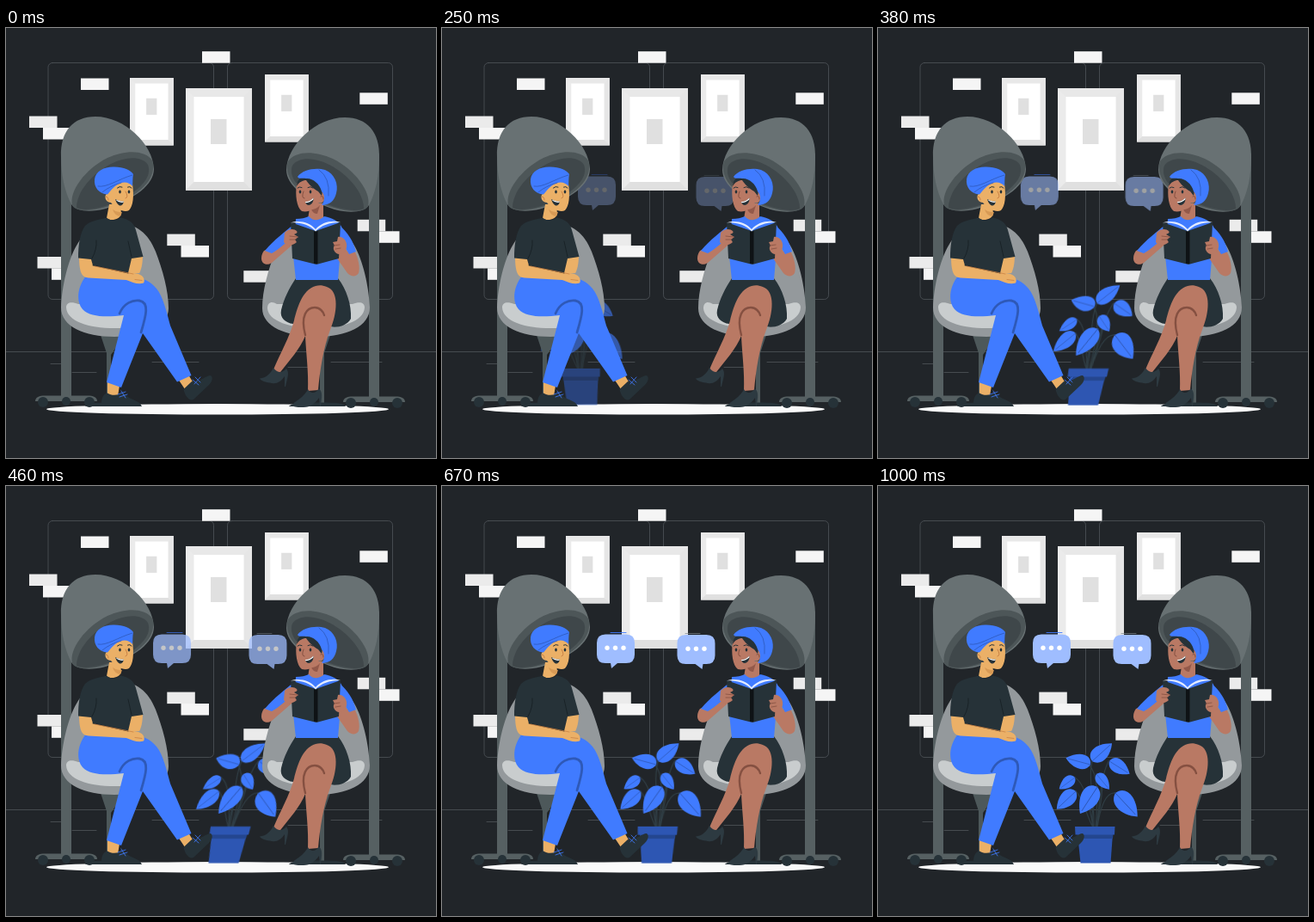
Write an HTML page without scripts that moves like this. It is 500 by 500 pixels and loops after 1.04 s.

```html
<!DOCTYPE html>
<html lang="en">
<head>
<meta charset="utf-8">
<title>Salon chat</title>
<style>
  html, body { margin: 0; width: 100%; height: 100%; overflow: hidden; background: #212529; }
  svg { display: block; width: 100vw; height: 100vh; }
  .blue { fill: #407bff; }
  .navy { fill: #2d56b3; }
  .ink { fill: #263238; }
  .pale { fill: #ebebeb; }
  .snow { fill: #f5f5f5; }
  .tan { fill: #ebb067; }
  .brown { fill: #b97964; }
  .line { fill: none; stroke-linecap: round; stroke-linejoin: round; }

  .plant, .bubble { animation: 1040ms linear infinite; }
  .plant { animation-name: dash; transform-origin: 256px 368px; }
  .bubble { animation-name: slide; }
  .left { --dir: -1; }
  .right { --dir: 1; }

  @keyframes dash {
    0%, 1.92% {
      transform: translateX(-230px) skewX(20deg); opacity: 0;
      animation-timing-function: cubic-bezier(.36, -.01, .5, 1.38);
    }
    53.85%, 56.25% {
      transform: translateX(0) skewX(-10deg); opacity: 1;
      animation-timing-function: cubic-bezier(.36, -.01, .5, 1.38);
    }
    75.5% {
      transform: translateX(0) skewX(2deg); opacity: 1;
      animation-timing-function: cubic-bezier(.36, -.01, .5, 1.38);
    }
    94.7%, 100% { transform: translateX(0) skewX(0); opacity: 1; }
  }
  @keyframes slide {
    0% { transform: translateX(calc(var(--dir) * 35px)); opacity: 0; }
    16.35% { transform: translateX(calc(var(--dir) * 26.5px)); opacity: .15; }
    31.73% { transform: translateX(calc(var(--dir) * 17.5px)); opacity: .46; }
    44.23% { transform: translateX(calc(var(--dir) * 9px)); opacity: .74; }
    52% { transform: translateX(calc(var(--dir) * 5px)); opacity: .92; }
    60%, 64.4% { transform: translateX(0); opacity: 1; }
    79.8% { transform: translateX(calc(var(--dir) * -2px)); opacity: 1; }
    96%, 100% { transform: translateX(0); opacity: 1; }
  }
</style>
</head>
<body>
<svg viewBox="0 0 500 500">
  <defs>
    <rect id="brick" width="32.500" height="13.500"/>

    <g id="picture">
      <path fill="#ebebeb" d="M0 0H77V119H0Z"/>
      <path fill="#e8e8e8" d="M0 0H77L67.500 10H9.500Z"/>
      <path fill="#e6e6e6" d="M77 0V119L67.500 109V10Z"/>
      <path fill="#e0e0e0" d="M0 119H77L67.500 109H9.500Z"/>
      <path fill="#fff" d="M9.500 10H67.500V109H9.500Z"/>
      <path fill="#e0e0e0" d="M29 36H47.500V65H29Z"/>
    </g>

    <g id="dryer">
      <path fill="#566062" d="M64 145H76V431H64Z"/>
      <path fill="#566062" d="M34 434C34 429 39 427.500 45 427.500H95C101 427.500 106 429 106 434Z"/>
      <g class="ink">
        <circle cx="43" cy="435" r="6"/><circle cx="97" cy="435" r="6"/><circle cx="70" cy="434" r="5"/>
      </g>
    </g>
    <g id="hood">
      <path fill="#687173" d="M64 150C63 120 78 103 104 103C138 103 171 135 172 164C172 182 150 199 116 210C97 215 81 213 76 205C68 190 64 170 64 150Z"/>
      <path fill="#4d5658" d="M77 206C73 190 92 164 118 151C140 141 162 142 170 154C175 170 164 186 140 199C115 212 82 217 77 206Z"/>
      <path fill="#3f474a" d="M82 209C82 191 99 170 122 158C140 149 158 149 165 159C170 172 158 186 137 198C116 209 92 214 82 209Z"/>
    </g>

    <g id="chair">
      <path fill="#4d585a" d="M110 357H138L122 380V437H117V378Z"/>
      <path class="ink" d="M92 440C94 436 104 435.500 120 435.500S156 436 158 440Z"/>
      <path fill="#94999c" d="M64 325C65 300 72 270 82 253C94 232 110 226 130 227C152 228 165 238 174 260C182 281 189 305 189 326C189 347 161 359 126 359S64 347 64 325Z"/>
      <path fill="#c9cdce" d="M70 325C70 319 76 318 84 321H172C178 317 183 319 183 326C182 341 156 349 126 349S71 341 70 325Z"/>
    </g>

    <g id="leaf">
      <path class="blue" d="M0 0C1 -11 15 -13 29 0C17 11 3 10 0 0Z"/>
      <path class="line" stroke="#2d56b3" stroke-width=".7" d="M0 0H26"/>
    </g>
  </defs>

  <rect width="500" height="500" fill="#212529"/>

  <g class="line" stroke="#50555a" stroke-width=".8">
    <rect x="49" y="40.500" width="192.500" height="275" rx="5"/>
    <rect x="257.500" y="40.500" width="192" height="275" rx="5"/>
    <path d="M0 376.500H500M52 390.500H65M77 400.500H105M170 388.500H224M328 394.500H365M378 388.500H437"/>
  </g>

  <g class="snow">
    <use href="#brick" x="228" y="27.200"/>
    <use href="#brick" x="87" y="58.500"/>
    <use href="#brick" x="411.300" y="75.300"/>
    <use href="#brick" x="43" y="116"/>
    <use href="#brick" x="203.500" y="253"/>
    <use href="#brick" x="53" y="279.300"/>
    <use href="#brick" x="425" y="236.300"/>
  </g>
  <g class="pale">
    <use href="#brick" x="27" y="102.500"/>
    <use href="#brick" x="187.300" y="239.600"/>
    <use href="#brick" x="36.500" y="266"/>
    <use href="#brick" x="276.300" y="282.200"/>
    <use href="#brick" x="408.700" y="222.800"/>
  </g>

  <use href="#picture" transform="translate(144 58) scale(.66)"/>
  <use href="#picture" transform="translate(209 70)"/>
  <use href="#picture" transform="translate(301 54) scale(.66)"/>

  <ellipse cx="246" cy="443.300" rx="199" ry="6.200" fill="#fafafa"/>

  <g class="bubble left">
    <path class="line" stroke="#407bff" stroke-width=".9" d="M196 170.500H214"/>
    <path fill="#9fbdff" d="M190 172.500H214Q224 172.500 224 182.500V196Q224 206 214 206H204L197 212L196 206H190Q180 206 180 196V182.500Q180 172.500 190 172.500Z"/>
    <g fill="#fff"><circle cx="192" cy="188.300" r="2.700"/><circle cx="201.500" cy="188.300" r="2.700"/><circle cx="211" cy="188.300" r="2.700"/></g>
  </g>
  <g class="bubble right">
    <path class="line" stroke="#7d8791" stroke-width=".7" d="M283 171.500H300"/>
    <path fill="#9fbdff" d="M283.500 173H307.500Q317.500 173 317.500 183V197Q317.500 207 307.500 207H303.500L302.500 213L294.500 207H283.500Q273.500 207 273.500 197V183Q273.500 173 283.500 173Z"/>
    <g fill="#fff"><circle cx="286" cy="189.300" r="2.700"/><circle cx="295.500" cy="189.300" r="2.700"/><circle cx="305" cy="189.300" r="2.700"/></g>
  </g>

  <g class="plant">
    <path class="line" stroke="#2f3d44" stroke-width="1.200" d="M251 397C252 370 244 340 249 320M253 397C256 365 256 335 246 325M254 397C258 370 258 340 268 320M250 397C246 370 240 345 229 339M253 397C258 380 260 362 261 350M250 397C248 380 250 362 255 350M250 397C243 385 238 362 230 355M255 397C259 370 266 356 276 357"/>
    <use href="#leaf" transform="translate(249 320) rotate(-42) scale(1.070)"/>
    <use href="#leaf" transform="translate(247 324) scale(-1 1) rotate(-15) scale(1.020)"/>
    <use href="#leaf" transform="translate(269 320) rotate(32) scale(.960)"/>
    <use href="#leaf" transform="translate(229 339) scale(-1 1) rotate(36) scale(.780)"/>
    <use href="#leaf" transform="translate(254 335) rotate(50) scale(.800)"/>
    <use href="#leaf" transform="translate(255 350) scale(-1 1) rotate(57) scale(1.270)"/>
    <use href="#leaf" transform="translate(230 355) scale(-1 1) rotate(43) scale(1.050)"/>
    <use href="#leaf" transform="translate(276 357) rotate(47) scale(1.300)"/>
    <path class="navy" d="M232 404H273L270.500 438.500H235.500Z"/>
    <path fill="#24468f" d="M232 404H273.500L273 410H232.500Z"/>
    <path class="navy" d="M229 396H275.500L275 405.500H229.500Z"/>
  </g>

  <use href="#dryer"/>
  <use href="#dryer" transform="matrix(-1 0 0 1 498 1)"/>
  <use href="#hood"/>
  <use href="#hood" transform="matrix(-1 0 0 1 498 1)"/>
  <use href="#chair"/>
  <use href="#chair" transform="matrix(-1 0 0 1 487 0)"/>

  <!-- seated on the left -->
  <g>
    <path class="tan" d="M118 410H133L130 428L118 427ZM200 408L212 403L218 413L208 420Z"/>
    <path class="ink" d="M111 437C111 429 114 425 118 424.500C123 428 130 427 137 424.500C143 433 157 433 157.500 440H111Z"/>
    <path class="ink" d="M206.500 420L216 411C224 413 232 404 238 404C241 406 240 411 236 415L218 432C213 434 208 428 206.500 420Z"/>
    <path class="line" stroke="#407bff" stroke-width=".8" d="M130 426L139 423M132 429L141 426M134 422L139 430M217 409L224 415M220 406L226 412M219 414L226 406"/>
    <path class="blue" d="M94 287C83 300 81 318 89 327C98 337 119 336 137 334L117 412L134 418L159 355L199 411.500L215.500 404L191 346C187 331 183 313 175 303C168 294 158 291 148 287Z"/>
    <path class="line" stroke="#2e59b8" stroke-width="2.800" d="M132 332C137 320 147 316 155 317C167 319 163 334 157 354"/>

    <path class="tan" d="M120 205L133 205L134 216C133 223 121 225 117 221Z"/>
    <path fill="#d89a55" d="M124 211Q129 215 135 214L133 219Q126 218 124 211Z"/>
    <path class="tan" d="M119 184C123 171 144 170 147 181C149 195 148 207 143 212C138 215 128 211 122 203C115 203 113 194 119 191Z"/>
    <path class="blue" d="M118 193.500C108 193 102 185 103 176C104 166 115 161 126 161.500C137 162 145 165 148 170C147 175 147.500 180 147 184C144 180 139 178.500 134 180C127 182 123 188 118 193.500Z"/>
    <path class="line" stroke="#2e59b8" stroke-width=".8" d="M107 184C117 186 130 176 147 171M134 180Q120 184 112 191"/>
    <g class="ink">
      <ellipse cx="132.500" cy="190.500" rx="1.300" ry="2"/><ellipse cx="143" cy="190.500" rx="1.300" ry="2"/>
      <path d="M127 199C131 201 134 202 137 201.500C136 206 134 207 132 206.500C129 205 128 202 127 199Z"/>
    </g>
    <path fill="#fff" d="M127.500 199.500C131 201 134 202 137 201.500L136.500 202.800C132 203.300 129 201.500 127.500 199.500Z"/>
    <path class="line" stroke="#263238" stroke-width="1" d="M129.500 186Q132 183.500 135 185M141.500 185Q144 183.500 146 186"/>
    <path class="line" stroke="#c98245" stroke-width="1" d="M139 190Q143 197 139 198M116 196Q119 196 119 200"/>

    <path class="tan" d="M85 265H100L103 277L154 286C160 288 162 293 160 296.500C154 298.500 147 296 140 293L96 290.500C89 290 85 286 85 265Z"/>
    <path class="tan" d="M145 264H159C159 274 157 282 155 285L137 286Z"/>
    <path class="ink" d="M117 220.500C121 225 130 224 133 220.500C143 222 149 227 151 235L159.500 266L146 268L142 285L101 276L99 269L84 267.500C84 252 86 238 92 230C98 224 108 223 117 220.500Z"/>
    <path class="line" stroke="#161f23" stroke-width=".8" d="M100 268Q106 257 105 247M146 266L142 248M101 276L142 285"/>
    <path class="line" stroke="#c98245" stroke-width=".8" d="M103 277L148 286M150 292.500L158 293.500"/>
  </g>

  <!-- reading on the right -->
  <g>
    <path class="ink" d="M337 291H386C396 304 402 322 401 338C396 347 384 349 376 347L334 344C325 343 318 337 320 328C323 315 329 303 337 291Z"/>
    <path class="brown" d="M360 300C344 304 338 328 335 340C330 359 319 378 311 397L317.500 402C330 386 342 373 348 358C349 380 352 400 351 422L363 421C365 398 369 372 377 351C385 332 388 306 373 301C368 299 364 299 360 300Z"/>
    <path class="line" stroke="#855041" stroke-width="2.400" d="M348 357C342 334 350 325 359 325C365 325 369 330 370 334"/>
    <g fill="#2d3a41">
      <path d="M295 407.500C303 407 308 401 311 395C315 401 321 402 326 396C330 401 327 407 325 417H324V405C320 411 315 414 309 413C303 412 297 411 295 407.500Z"/>
      <path d="M333 439C334 434 345 432 351 420C354 426 361 425 363.500 419C369 423 367 430 366 440H365L364 430C360 436 354 441 346 441C340 441 335 441 333 439Z"/>
    </g>

    <path class="brown" d="M354 204H369V222C365 228 354 227 351 222Z"/>
    <path fill="#93594a" d="M355 211Q361 211 365 206L362 216Q357 216 355 211Z"/>
    <path class="blue" d="M337 222C343 222 348 221 352 219C357 225 365 224 370 219C379 221 388 224 391 233L386 293H337L334 265Z"/>

    <path class="brown" d="M338 182C341 173 361 172 365 184L370 193C373 200 367 205 364 203C360 210 352 215 344 213C338 209 336 194 338 182Z"/>
    <path class="ink" d="M349 172C358 171 371 182 367 195L363 190C356 186 351 180 349 177C345 177 341 179 338 184C338 177 343 172 349 172Z"/>
    <path class="blue" d="M339 173C345 164 361 162 371 165C382 169 387 182 384 192C382 201 376 206 367 206C371 201 371 194 367 190C365 181 356 174 349 175C344 174 341 176 339 173Z"/>
    <path class="line" stroke="#2e59b8" stroke-width=".8" d="M364 165Q377 174 375 195"/>
    <g class="ink">
      <ellipse cx="342" cy="190.500" rx="1.300" ry="2"/><ellipse cx="354" cy="190.500" rx="1.300" ry="2"/>
      <path d="M348 202C352 202 355 200 357.500 197.500C358 202 355 206 352 206C350 206 348 204 348 202Z"/>
    </g>
    <path fill="#fff" d="M348 202C352 202 355 200 357.500 197.500L357.300 199.500Q353 203.300 348.300 203.200Z"/>
    <path class="line" stroke="#263238" stroke-width="1" d="M339 186Q341 184 344 185.500M351 185.500Q354 183.500 357 186"/>
    <path class="line" stroke="#855041" stroke-width="1" d="M346 190Q343 198 347 198M366 196Q369 194 369 199"/>

    <path class="brown" d="M300 259L324 248L329 237C333 232 340 236 339 242C341 248 337 252 332 253L309 273C303 277 297 274 297 268C297 264 298 262 300 259Z"/>
    <path class="blue" d="M334 229C325 236 311 247 301 259L309 262C319 256 328 248 333 241Z"/>
    <path class="brown" d="M388 246L397 260L405 259C410 268 412 279 410 285C407 290 401 289 397 285L383 265Z"/>
    <path class="blue" d="M388 230C397 237 404 248 407 260L399 263C393 253 388 246 388 230Z"/>

    <path class="ink" d="M331 226L360 236L389 226L387 268L361 275L333 268Z"/>
    <path fill="#e3ecff" d="M331 226.500C341 223 353 226 360 234C367 226 379 223 389 226C378 225.500 367 229 360 236.500C353 229 342 225.500 331 226.500Z"/>
    <path fill="#0e1215" d="M358 236L360 237L362.500 236V274H358Z"/>

    <path class="brown" d="M324 238C328 233 335 233 338 236C340 239 336 239 335 240L340 243L336 246L338 249C333 254 326 253 323 249Z"/>
    <path class="brown" d="M386 243C391 242 395 246 396 251C397 258 393 263 387 263C382 262 379 256 382 253L380 249L385 248Z"/>
    <path class="line" stroke="#855041" stroke-width=".8" d="M330 242L339 243M330 246L337 246M381 253L388 252M383 257L389 256"/>
  </g>
</svg>
</body>
</html>
```
